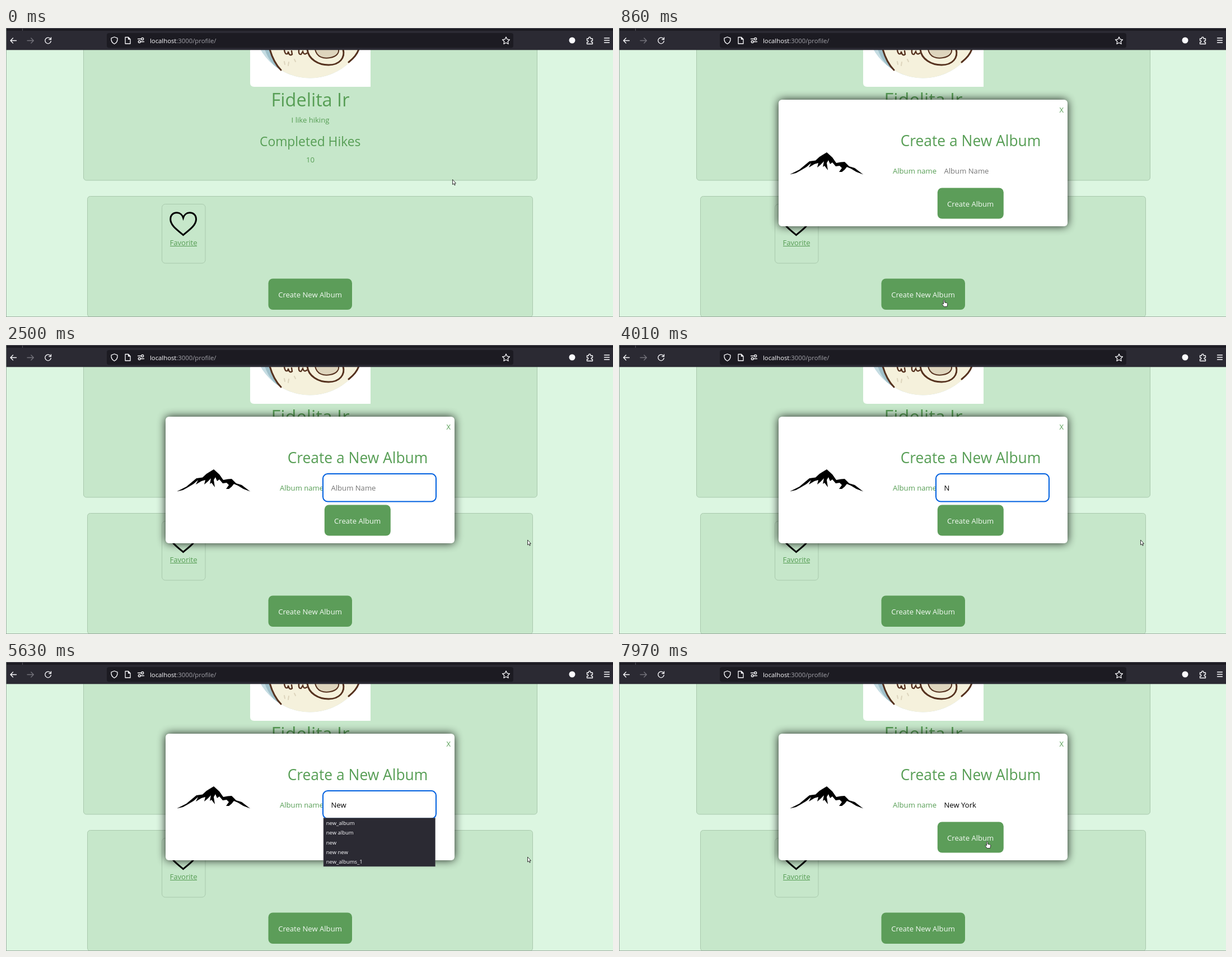
Write an HTML page that moves like this. It is 1084 px wide and 516 px high and loops after 8000 ms.

```html
<!DOCTYPE html>
<html lang="en">
<head>
<meta charset="utf-8">
<title>Create album</title>
<style>
  html, body { margin: 0; width: 100%; height: 100%; overflow: hidden; background: #dcf6e1; }
  svg { display: block; width: 100%; height: 100%; }
  text { font: 13.1px "Open Sans", "Noto Sans", sans-serif; fill: #579e55; white-space: pre; }
  .mid { text-anchor: middle; }
  .card { fill: #c6e7ca; stroke: #a9c9ad; }
  .button { fill: #5c9d59; }
  .light { fill: #f4fbf4; }
  .icon { fill: none; stroke: #fbfbfe; stroke-width: 1.3; stroke-linecap: round; stroke-linejoin: round; }
  .brown { fill: none; stroke: #56321f; stroke-width: 3; stroke-linecap: round; }
  #url { font-size: 11.3px; fill: #a3a3aa; }
  #list text { font-size: 9.5px; fill: #fbfbfe; }
</style>
</head>
<body>
<svg viewBox="0 0 1084 516">
  <defs>
    <filter id="blur" x="-20%" y="-30%" width="140%" height="160%"><feGaussianBlur stdDeviation="8"/></filter>
  </defs>
  <rect width="1084" height="516" fill="#dcf6e1"/>

  <!-- profile card -->
  <rect class="card" x="138.5" y="0.5" width="810" height="271.5" rx="5"/>
  <path d="M436 30H651V105H443Q436 105 436 98Z" fill="#fff"/>
  <circle cx="543" cy="-13" r="102.5" fill="#c5dce2"/>
  <path d="M462 38Q472 66 491 75L471 38Z" fill="#9fc0ca"/>
  <path d="M471 38Q478 62 491 75.3A102.5 102.5 0 0 0 617 58L630 38Z" fill="#f5f1dc"/>
  <g class="brown">
    <path d="M471 38Q478 62 491 75M630 38Q626 50 612 61"/>
    <path d="M538 38C540 56 558 66 576 66C596 66 606 53 602 38" fill="#f5f1dc"/>
    <path d="M552 38C555 53 568 55 579 53C591 51 595 44 594 38" fill="#ded5bd" stroke-width="2"/>
    <path d="M497 39Q498 48 503 46L504 42Q506 51 511 47L510 41M523 39Q522 48 527 47L530 42Q532 49 537 45" stroke-width="2.4"/>
    <path d="M497 60l1 5M505 61l-1 6M515 56l2 4" stroke="#ddd5bd" stroke-width="2"/>
  </g>
  <g class="mid">
    <text x="543.5" y="140" style="font-size:32.5px">Fidelita Ir</text>
    <text x="543.5" y="169">I like hiking</text>
    <text x="543.2" y="211" style="font-size:22.8px">Completed Hikes</text>
    <text x="543.5" y="240">10</text>
  </g>

  <!-- album card -->
  <rect class="card" x="145.5" y="300.5" width="795" height="215.5" rx="5"/>
  <rect class="card" x="278.5" y="314.5" width="77.5" height="105.5" rx="6"/>
  <path d="M316.5 369.5C303 358.500 293.700 351.500 293.700 341.500C293.700 333.500 299 329.800 305 329.800C311 329.800 315 334 316.500 339C318 334 322 329.800 328 329.800C334 329.800 339.500 333.500 339.500 341.500C339.500 351.500 330 358.500 316.500 369.500Z"
        fill="none" stroke="#000" stroke-width="3"/>
  <text class="mid" x="317" y="388">Favorite</text>
  <path d="M293 389.5H341" stroke="#579e55"/>
  <rect class="button" x="468.5" y="447.5" width="149.5" height="55.5" rx="8"/>
  <text class="mid light" x="543" y="481">Create New Album</text>

  <!-- browser toolbar -->
  <rect width="1084" height="39.3" fill="#2b2a33"/>
  <path d="M0 0H1084V5H0Z" fill="#1c1b22"/>
  <path d="M0 .5H1084M29.5 0V5" stroke="#55545c"/>
  <rect x="180" y="9" width="726" height="26.5" rx="4" fill="#1c1b22"/>
  <text id="url" x="257" y="27"><tspan fill="#fbfbfe">localhost</tspan>:3000/profile/</text>
  <g class="icon">
    <path d="M18.5 22.5H8M12.5 18L8 22.5L12.5 27"/>
    <path d="M38 22.5H49M44.8 18L49.3 22.5L44.8 27" stroke="#74737b"/>
    <path d="M79.5 19.5A5.3 5.3 0 1 0 80.3 23.5M80.5 16.8V20.5H76.8"/>
    <path d="M193.5 16L199 18.2C199.5 23 197.5 26.5 193.5 28.5C189.5 26.5 187.5 23 188 18.2Z"/>
    <path d="M213 16.5H218.5L222 20V28H213ZM218.5 16.5V20H222"/>
    <path d="M235.5 19.5H241M246.5 24.5H241"/>
    <circle cx="243.7" cy="19.5" r="2"/><circle cx="238.3" cy="24.5" r="2"/>
    <path d="M893 16L895 20.2L899.5 20.8L896.2 24L897 28.5L893 26.3L889 28.5L889.8 24L886.5 20.8L891 20.2Z"/>
    <path d="M1037.5 19H1040.5V18A1.7 1.7 0 0 1 1044 18V19H1047.5V22.5H1046A1.7 1.7 0 0 0 1046 25.5H1047.5V28.5H1037.5V25.5H1039A1.7 1.7 0 0 0 1039 22.5H1037.5Z"/>
    <path d="M1068.5 18H1077.5M1068.5 22H1077.5M1068.5 26H1077.5"/>
  </g>
  <circle cx="1011" cy="22" r="5.5" fill="#fbfbfe"/>
  <path d="M.5 0V516M0 515.5H1084" stroke="#8d9a90" stroke-opacity=".75"/>

  <!-- dialog -->
  <g id="dialog">
    <rect x="285" y="128" width="516" height="226" rx="6" opacity=".85" filter="url(#blur)"/>
    <rect x="285" y="128" width="516" height="226" rx="6" fill="#fff"/>
    <path d="M305 261.500L322 253L334 243L340 238L351 236.500L358 230L371 222L381 231L388 241L396 239.500L403 239L411 247L421 250L436 261.500L424 257L414 251L407 248L403 253L398 257H393L398 250L394 246L387 247L381 240L377 243L374 236L371 241L373 254L367 246L364 248L366 238L359 245L354 249L356 241L349 243L339 249L343 241L335 248L325 254L316 259Z"/>
    <text class="mid" x="790.3" y="151">X</text>
    <text class="mid" x="628" y="211" style="font-size:26.4px">Create a New Album</text>
    <text x="489" y="260">Album name</text>
    <rect class="button" x="568.8" y="285.5" width="118" height="55" rx="8"/>
    <text class="mid light" x="627.7" y="319">Create Album</text>
    <rect id="field" x="566" y="230" width="202" height="49.5" rx="8.5" fill="#fff" stroke="#0060df" stroke-width="2"/>
    <text id="hint" x="580.5" y="260" style="fill:#757575">Album Name</text>
    <text id="value" x="580.5" y="260" style="fill:#000"></text>
    <rect id="caret" y="245" width="1" height="19"/>
    <g id="list"><rect x="567" y="278.5" width="199.5" height="86.5" fill="#2b2a33" stroke="#55545c" stroke-width=".5"/></g>
  </g>

  <!-- pointer shapes, each with its hot spot at 0,0 -->
  <g id="pointer" stroke="#222" stroke-width=".9" stroke-linejoin="round" fill="#fff">
    <path id="arrow" d="M.5 .5V9.5L2.5 7.7L4 10.8L5.3 10.2L4 7.2H6.5Z"/>
    <path id="hand" d="M-1 .8Q0 -.3 1 .8V4.5L5.3 5.5Q6.5 6 6.3 7.5L5.3 12H-.2L-3.3 7.8Q-3.5 6.3 -2.2 6.5L-1 7.5Z"/>
    <path id="beam" d="M-2.5 -11Q0 -11 0 -9.5Q0 -11 2.5 -11M0 -9.5V9.5M-2.5 11Q0 11 0 9.5Q0 11 2.5 11" fill="none"/>
  </g>
</svg>
<script>
  const DURATION = 8000;
  const $ = id => document.getElementById(id);

  // Each track holds [start time, value]; values change without blending.
  const tracks = {
    dialog: [[0, 0], [860, 1]],
    field: [[0, 0], [1890, 1], [7970, 0]],
    list: [[0, 0], [4130, 1], [6380, 0]],
    caret: [[0, 0], [1890, 1], [2380, 0], [3000, 1], [3500, 0], [4620, 1], [5120, 0],
            [5510, 1], [5630, 0], [6380, 1], [7240, 0], [7730, 1], [7970, 0]],
    value: [[0, ""], [4010, "N"], [4500, "Ne"], [5510, "New"], [5630, "New "], [6380, "New Y"],
            [6630, "New Yo"], [6750, "New Yor"], [6870, "New York"]],
    pointer: [[0, ["arrow", 797, 270]], [250, ["arrow", 765, 322]], [370, ["arrow", 685, 418]],
              [490, ["hand", 604, 476]], [610, ["hand", 580.5, 485.5]],
              [1110, ["arrow", 630, 432]], [1230, ["arrow", 685, 346]], [1350, ["hand", 671, 313.5]],
              [1500, ["beam", 653.5, 254]], [1750, ["none", 0, 0]], [1890, ["beam", 653.5, 254]],
              [2260, ["arrow", 760, 300]], [2380, ["arrow", 890, 340]], [2500, ["arrow", 931, 347.5]],
              [7490, ["arrow", 912, 350]], [7610, ["arrow", 812, 344]], [7730, ["arrow", 708, 330]],
              [7850, ["hand", 664, 322]], [7970, ["hand", 657.5, 320.5]]]
  };
  const at = (name, time) => tracks[name].findLast(([start]) => start <= time)[1];
  const show = (id, on) => $(id).setAttribute("visibility", on ? "inherit" : "hidden");

  ["new_album", "new album", "new", "new new", "new_albums_1"].forEach((label, row) => {
    const text = document.createElementNS("http://www.w3.org/2000/svg", "text");
    text.setAttribute("x", 571.7);
    text.setAttribute("y", 291 + row * 17.25);
    text.textContent = label;
    $("list").append(text);
  });

  function draw(now) {
    const time = now % DURATION;
    for (const id of ["dialog", "field", "list", "caret"]) show(id, at(id, time));

    const value = at("value", time);
    show("hint", !value);
    $("value").textContent = value;
    const width = value ? $("value").getComputedTextLength() : 0;
    $("caret").setAttribute("x", Math.floor(580.5 + width));

    const [shape, x, y] = at("pointer", time);
    $("pointer").setAttribute("transform", `translate(${x} ${y})`);
    for (const id of ["arrow", "hand", "beam"]) show(id, id === shape);
  }

  function tick() {
    draw(performance.now());
    requestAnimationFrame(tick);
  }
  tick();
</script>
</body>
</html>
```
